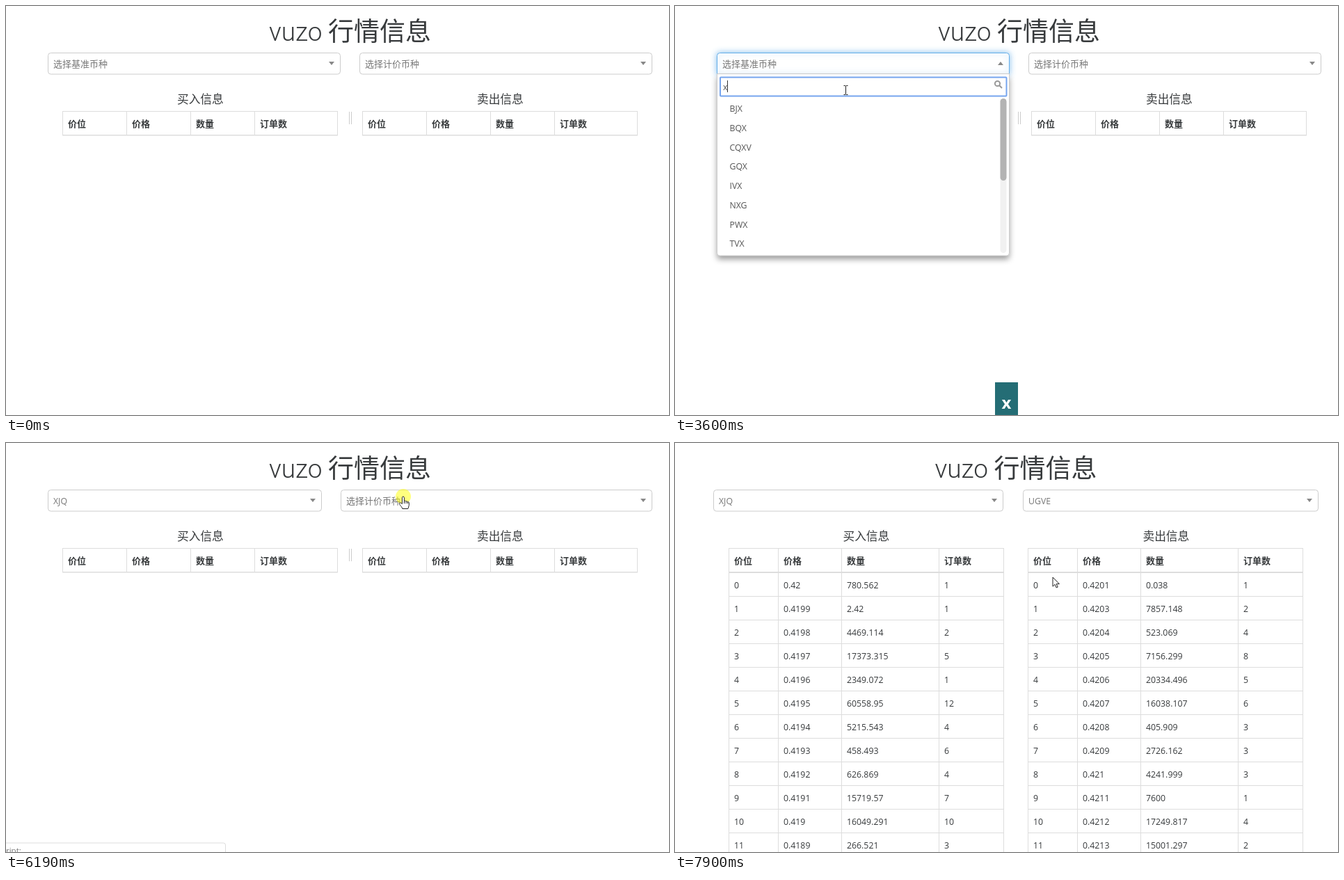
An HTML page with a canvas that plays this animation: 953 px wide and 588 px high, repeating every 8000 ms.

```html
<!DOCTYPE html>
<html lang="zh-CN">
<head>
<meta charset="utf-8">
<style>
html, body { margin: 0; width: 100%; height: 100%; overflow: hidden; background: #fff; }
canvas { display: block; }
</style>
</head>
<body>
<canvas id="stage" width="953" height="588"></canvas>
<script>
const ctx = document.getElementById('stage').getContext('2d');
const LOOP = 8000, PICKED = 5170, PRICED = 7350, LOADED = 7580;
const INK = '#373a3c', GREY = '#777', LINE = '#ddd', ROW = 27.75;

const ALL = ['AHQ', 'AJV', 'AKJ', 'ANQ', 'AQW', 'AVQ', 'AW', 'AWQ'];
const WITH_X = ['BJX', 'BQX', 'CQXV', 'GQX', 'IVX', 'NXG', 'PWX', 'TVX'];
const BASE = 'XJQ', QUOTES = ['BQJ', 'EJW', 'OVQ', 'UGVE'];
const HEADS = ['价位', '价格', '数量', '订单数'];
const BIDS = {
  price: i => 0.42 - i / 1e4,
  amount: [780.562, 2.42, 4469.114, 17373.315, 2349.072, 60558.95, 5215.543, 458.493, 626.869, 15719.57, 16049.291, 266.521],
  orders: [1, 1, 2, 5, 1, 12, 4, 6, 4, 7, 10, 3]
};
const ASKS = {
  price: i => (i ? 0.4202 : 0.4201) + i / 1e4,
  amount: [0.038, 7857.148, 523.069, 7156.299, 20334.496, 16038.107, 405.909, 2726.162, 4241.999, 7600, 17249.817, 15001.297],
  orders: [1, 2, 4, 8, 5, 6, 3, 3, 3, 1, 4, 2]
};

// time, x, y, pointer shape from that moment on
const PATH = [
  [380, 877, 574, 'arrow'], [1170, 316, 88, 'hand'], [1390, 316, 88, 'hand'], [1480, 274, 74, 'hand'],
  [1600, 274, 74, 'hand'], [1640, 277, 84, 'hand'], [2280, 277, 84, 'hand'], [2350, 266, 97, 'hand'],
  [2430, 266, 97, 'hand'], [2620, 254, 142, 'hand'], [2760, 248, 128, 'beam'], [2900, 245.5, 121, 'beam'],
  [4620, 245.5, 121, 'beam'], [4840, 215, 136, 'hand'], [5000, 197.5, 143.5, 'hand'],
  [PICKED, 197.5, 143.5, 'arrow'], [5480, 197.5, 143.5, 'arrow'], [5960, 571, 77, 'hand'],
  [6510, 571, 77, 'hand'], [6960, 546, 229.5, 'hand'], [PRICED, 546, 229.5, 'arrow'],
  [7400, 546, 229.5, 'arrow'], [7900, 543, 193, 'arrow']
];
const CLICKS = [[1790, 1950], [5000, 5230], [6190, 6350], [7190, PRICED]];

const during = (t, a, b) => t >= a && t < b;
const ramp = (t, a, b) => Math.min(1, Math.max(0, (t - a) / (b - a)));

function rect(x, y, w, h, fill) {
  ctx.fillStyle = fill;
  ctx.fillRect(x, y, w, h);
}
function box(x, y, w, h, r, fill, stroke, width = 1) {
  ctx.beginPath();
  ctx.roundRect(x, y, w, h, r);
  if (fill) { ctx.fillStyle = fill; ctx.fill(); }
  if (stroke) { ctx.strokeStyle = stroke; ctx.lineWidth = width; ctx.stroke(); }
}
function text(s, x, y, color = INK, weight = 400, size, font = 'Open Sans') {
  s = String(s);
  size ||= /[一-龥]/.test(s) ? 13 : 12.3;
  ctx.font = `${weight} ${size}px "${font}", "Noto Sans CJK SC", "Noto Sans CJK", sans-serif`;
  ctx.fillStyle = color;
  ctx.fillText(s, x, y);
}
function shadow(color, blur, dy, draw) {
  ctx.save();
  ctx.shadowColor = color;
  ctx.shadowBlur = blur;
  ctx.shadowOffsetY = dy;
  draw();
  ctx.restore();
}

function pointerAt(t) {
  const i = PATH.findLastIndex(k => k[0] <= t);
  if (i < 0) return null;
  const a = PATH[i], b = PATH[i + 1] || a;
  let u = b === a ? 0 : (t - a[0]) / (b[0] - a[0]);
  u *= u * (3 - 2 * u);
  if (b !== a) u = (() => { const v = (t - a[0]) / (b[0] - a[0]); return v * v * (3 - 2 * v); })();
  return { x: a[1] + (b[1] - a[1]) * u, y: a[2] + (b[2] - a[2]) * u, shape: a[3] };
}

const ARROW = new Path2D('M0 0V13.2L3.1 10.3 5.2 15 7.2 14.1 5.2 9.6H9.4Z');
const HAND = new Path2D('M-1.6 10.5V1.6a1.5 1.5 0 0 1 3 0V6.8c.6-.9 2.4-.7 2.6.4.7-.7 2.2-.5 2.4.6.8-.5 1.9 0 1.9 1.2V12.5c0 2-1.3 3-1.5 5H-1.2c-.3-2-2-3.4-3.4-5.4-.8-1.2-1.6-2.1-.9-2.8 1-.9 2.6 0 3.9 1.2z');
const FINGERS = new Path2D('M1.4 7v3M4 7.5v2.5M6.4 8v2');
const BEAM = new Path2D('M-3 -6.5h2.2l.8.6.8-.6H3M0 -6V6M-3 6.5h2.2l.8-.6.8.6H3');

function drawPointer(p, clicked) {
  ctx.save();
  ctx.translate(p.x, p.y);
  if (clicked) {
    ctx.beginPath();
    ctx.arc(0, 0, 11, 0, 7);
    ctx.fillStyle = 'rgba(255,255,0,.5)';
    ctx.fill();
  }
  ctx.lineWidth = 1;
  ctx.strokeStyle = '#222';
  ctx.fillStyle = '#fff';
  if (p.shape === 'beam') ctx.stroke(BEAM);
  else {
    const shape = p.shape === 'hand' ? HAND : ARROW;
    ctx.fill(shape);
    ctx.stroke(shape);
    if (shape === HAND) ctx.stroke(FINGERS);
  }
  ctx.restore();
}

function drawSelect(l, r, label, open) {
  const draw = () => box(l + .5, 67.5, r - l, 30.5, open ? [4, 4, 0, 0] : 4, '#fff', open ? '#66afe9' : '#ccc');
  if (open) shadow('rgba(102,175,233,.8)', 8, 0, draw);
  else draw();
  text(label, l + 8, 88, GREY);
  const x = r - 12, d = open ? -2.5 : 2.5;
  ctx.beginPath();
  ctx.moveTo(x - 4, 82.5 - d);
  ctx.lineTo(x + 4, 82.5 - d);
  ctx.lineTo(x, 82.5 + d);
  ctx.fillStyle = '#888';
  ctx.fill();
}

function drawPanel(l, r, bottom) {
  shadow('rgba(0,0,0,.4)', 8, 5, () => box(l + .5, 98, r - l, bottom - 98, [0, 0, 4, 4], '#fff'));
  box(l + .5, 97.5, r - l, bottom - 97.5, [0, 0, 4, 4], '#fff', '#ccc');
}

function drawItems(items, x, top, left, right, p) {
  const hover = Math.floor((p.y - top) / ROW);
  items.forEach((name, i) => {
    if (i === hover) rect(left, Math.round(top + i * ROW), right - left, 28, '#ededed');
    text(name, x, Math.round(top + i * ROW + 18.4), '#555');
  });
}

function drawSearch(t, p) {
  const typed = t < 3510 ? '' : t < 3830 ? 'x' : 'xj';
  const items = [ALL, WITH_X, [BASE]][typed.length];
  const many = items.length > 1;
  drawPanel(60, 480, many ? 359 : 165);
  drawItems(items, 78.5, 133.6, 64, many ? 467 : 477, p);
  if (many) {
    box(467.5, 133, 9, 222, 4.5, '#f1f1f1');
    box(467.5, 133, 9, typed ? 118 : 13, 4.5, '#b3b3b3');
  }
  box(65, 102.5, 411.5, 27, 1, '#fff', '#76a5ee', 2);
  text(typed, 69, 121, '#555');
  if (during(t, 1950, 2490) || during(t, 3050, 4380) || t >= 4900)
    rect([69, 75, 79][typed.length], 107, 1, 17, '#333');
  ctx.beginPath();
  ctx.arc(463.5, 111.5, 3.6, 0, 7);
  ctx.moveTo(466.3, 114.3);
  ctx.lineTo(470, 118);
  ctx.strokeStyle = '#999';
  ctx.lineWidth = 2;
  ctx.stroke();
}

function drawQuotes(p) {
  drawPanel(481, 929, 246);
  text(BASE, 491, 123, '#999', 700);
  drawItems(QUOTES, 499.5, 132.2, 485, 925, p);
}

function drawTable(x, title, titleX, cols, data) {
  text(title, titleX, 140, INK, 400, 16.7);
  const bottom = data ? 590 : 186;
  rect(x, 151, cols[4] + 1, 1, LINE);
  rect(x, 185, cols[4] + 1, data ? 2 : 1.5, LINE);
  cols.forEach(c => rect(x + c, 151, 1, bottom - 151, LINE));
  HEADS.forEach((h, i) => text(h, x + cols[i] + 8, 174, INK, 700));
  if (!data) return;
  data.amount.forEach((amount, i) => {
    const y = 209 + 34 * i;
    rect(x, y + 11, cols[4] + 1, 1, LINE);
    [i, +data.price(i).toFixed(4), amount, data.orders[i]].forEach((v, c) => text(v, x + cols[c] + 8, y));
  });
}

function drawStatus(t) {
  const first = during(t, 1170, 2600), second = during(t, 6110, 7060);
  if (!first && !second) return;
  ctx.globalAlpha = 1 - (first ? ramp(t, 2480, 2600) : ramp(t, 6940, 7060));
  box(-5, 575, 320.5, 20, 3, '#fff', LINE);
  if (t >= 6150 || during(t, 1240, 2600)) text('ript:', 0, 590, GREY, 400, 11.5);
  ctx.globalAlpha = 1;
}

function drawKeys(t) {
  if (!during(t, 3510, 4760)) return;
  ctx.globalAlpha = (t < 3600 ? .5 : 1) * (1 - ramp(t, 4500, 4760));
  const keys = t < 3830 ? [['x', 460]] : [['x', 439], ['j', 482]];
  ctx.textAlign = 'center';
  for (const [key, x] of keys) {
    rect(x, 541, 33, 47, '#246d75');
    text(key, x + 16.5, 579, '#fff', 700, 24);
  }
  ctx.textAlign = 'left';
  ctx.globalAlpha = 1;
}

function draw(t) {
  const loaded = t >= LOADED, dx = loaded ? -4.5 : 0;
  const p = pointerAt(t);
  const openLeft = during(t, 1950, PICKED), openRight = during(t, 6350, PRICED);
  rect(0, 0, 953, 588, '#fff');

  text('vuzo', 378 + dx, 50, INK, 300, 37, 'Roboto');
  text('行情信息', 463 + dx, 50, INK, 300, 37);

  const cols = loaded ? [0, 71, 162, 302, 395] : [0, 92, 184, 276, 395];
  drawTable(loaded ? 77 : 81, '买入信息', 246 + dx, cols, loaded && BIDS);
  drawTable(loaded ? 507 : 512, '卖出信息', 677 + dx, cols, loaded && ASKS);
  if (!loaded) for (const x of [493, 496]) rect(x, 152, 1, 18, '#ccc');

  const [l1, r1, l2, r2] = loaded ? [55, 471, 500, 924] : t >= PRICED ? [60, 476, 504, 928]
    : t >= PICKED ? [60, 453, 481, 928] : [60, 480, 508, 928];
  drawSelect(l1, r1, t < PICKED ? '选择基准币种' : BASE, openLeft);
  drawSelect(l2, r2, t < PRICED ? '选择计价币种' : QUOTES[3], openRight);
  if (openLeft) drawSearch(t, p);
  if (openRight) drawQuotes(p);

  drawStatus(t);
  drawKeys(t);
  if (p) drawPointer(p, CLICKS.some(c => during(t, ...c)));
}

const start = performance.now();
function tick() {
  draw((performance.now() - start) % LOOP);
  requestAnimationFrame(tick);
}
tick();
</script>
</body>
</html>
```
